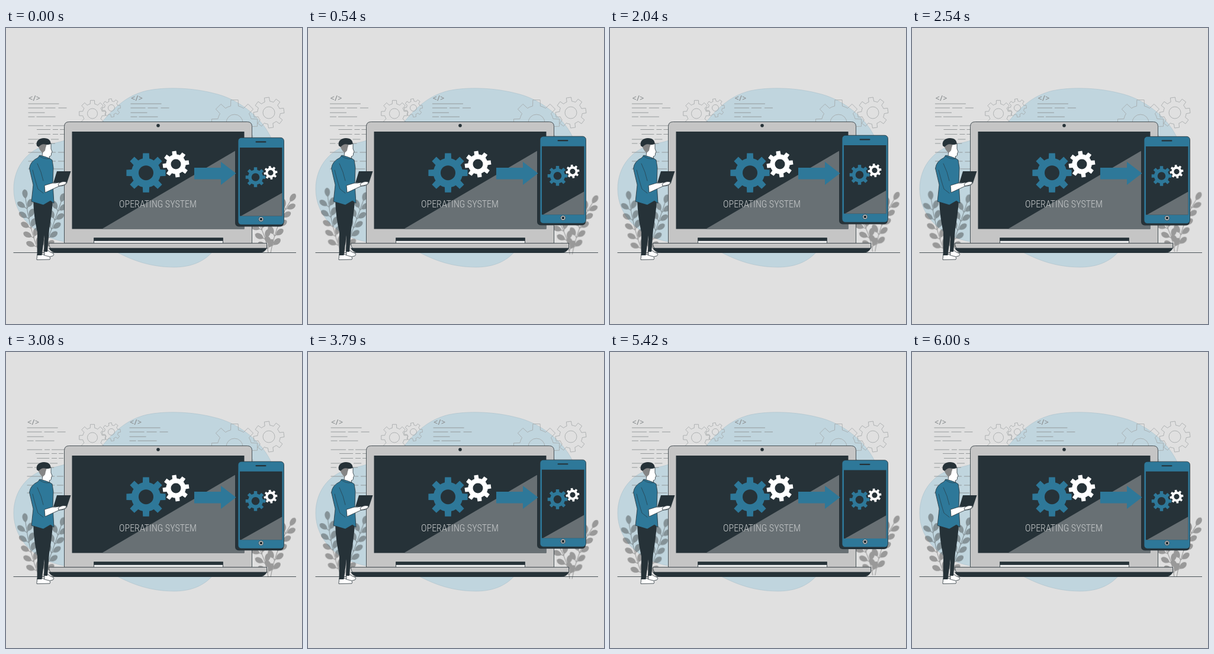
These frames come from a looping animation (500 by 500 pixels, 6040 ms). An HTML page:

```html
<!DOCTYPE html>
<html lang="en">
<head>
<meta charset="utf-8">
<title>Operating system</title>
<style>
html, body { margin: 0; width: 100%; height: 100%; overflow: hidden; background: #e0e0e0; }
svg { display: block; width: 100%; height: 100%; }
.dark { fill: #263238; }
.blue { fill: #2e7899; }
.white { fill: #fff; }
.glass { fill: #687074; }
.edge { stroke: #263238; stroke-width: .8; stroke-linejoin: round; }
.thin { fill: none; stroke: #263238; stroke-width: .6; stroke-linecap: round; }
.outline { fill: none; stroke: #a3a6a8; stroke-width: .8; }
.code { fill: none; stroke: #8e9294; stroke-width: .9; }
.tag { fill: #8e9294; stroke: none; font: 600 12.5px "Open Sans", sans-serif; letter-spacing: .4px; }
#plants { opacity: .38; }
.leaf { fill: #222; }
.stem { fill: none; stroke: #222; stroke-width: 1.1; }
#title { fill: #c9cccd; font: 300 16px "Roboto Condensed", "Open Sans Condensed", "Liberation Sans Narrow", Roboto, "Open Sans", sans-serif; font-stretch: 75%; text-anchor: middle; }
</style>
</head>
<body>
<svg viewBox="0 0 500 500">
  <path fill="#c0d5de" stroke="#a9c0ca" stroke-width=".6" d="M13 272C13 234 37 202 80 195C112 188 145 174 163 158C185 132 205 114 237 106C270 99 315 101 350 110C392 119 430 150 446 182C468 225 452 290 415 318C380 345 362 368 347 380C330 398 307 404 284 404C245 404 215 393 188 379C160 366 125 365 98 361C50 352 13 318 13 272Z"/>
  <g id="outlines"></g>
  <g id="code" class="code"></g>
  <g id="plants"></g>
  <path class="edge" d="M12.5 379.5H490"/>

  <g id="laptop">
    <path class="edge" fill="#c5c5c5" d="M98.5 364V166.5Q98.5 158.5 106.5 158.5H407.5Q415.5 158.5 415.5 166.5V364Z"/>
    <path class="dark" d="M111.500 175H402.500V339.500H111.500Z"/>
    <path class="glass" d="M162 339.5L402.5 198.5V339.5Z"/>
    <circle class="dark" cx="257" cy="164.7" r="2.8"/>
    <path class="edge" fill="#f4f4f4" d="M148.5 354.5H366.5V364H148.5Z"/>
    <path class="dark" d="M148.500 354.500H366.500V359.700H148.500Z"/>
    <path class="dark" d="M72 371.5H441Q437 380 427 380H87Q76 380 72 371.5Z"/>
    <path class="edge" fill="#c5c5c5" d="M72.5 363.5H440.5V372H76Q72.5 370 72.5 363.5Z"/>
    <text id="title" x="256.5" y="297" dy=".36em">OPERATING SYSTEM</text>
  </g>

  <g id="phone">
    <rect class="dark" x="387" y="187" width="82" height="148.500" rx="6"/>
    <rect class="blue edge" x="392" y="185.300" width="77.500" height="147" rx="5.500"/>
    <path class="dark" d="M395 202H466.500V317.500H395Z"/>
    <path class="glass" d="M397 317.500L466.500 278.500V317.500Z"/>
    <rect class="dark" x="421.500" y="191.300" width="18" height="2.200" rx="1.100"/>
    <circle class="white edge" cx="430.800" cy="323" r="4"/>
    <rect class="dark" x="428.500" y="320.700" width="4.600" height="4.600" rx="1"/>
  </g>
  <path class="blue" d="M318 236H363V226L388.500 245.500L363 265V255.500H318Z"/>

  <g id="person">
    <path class="white edge" d="M65 385L65 376L70 375.500Q74 379 80 380.500Q82 385 77 385.500L68 388Z"/>
    <path class="white edge" d="M52 390L53 382L61 382Q66 385 73 386Q76 388 74 391L52 391.500Z"/>
    <path class="dark" d="M46 291L79 292Q77 318 73 340L70 378H64L65 350L60.500 384H52.500L53 345Q47 320 46 291Z"/>
    <path class="white edge" d="M62 204L61 217Q68 224 74 221L73 217Q77 217 76.500 212L78 209L76 204V195H65Z"/>
    <path fill="#858585" d="M54 196L69 196L67 202L66 207L62 211Q55 206 54 196Z"/>
    <path class="dark" d="M52 199C50 191 56 186 64 186C72 186 76 190 75.500 196Q71 198 66 196.500Q60 195 55 201Z"/>
    <path class="blue edge" d="M54 219L57 215Q66 217 73 220L78 223L80 236L79 262L81 296L75 292L63 299L43 293L46 265L39.500 237Q41 225 54 219Z"/>
    <path class="thin" d="M56 216Q64 222 73 221M53 229Q60 243 63 258M45 240Q50 260 54 272L63 279"/>
    <path class="white edge" d="M65 266L66 278L90 267Q101 267 103 261L97 258L84 262L78 262Z"/>
    <path class="dark" d="M80 261.500L86 242H109.500L103 261.500Z"/>
    <path class="white edge" d="M88 264Q93 258 102 260Q103 262 98 265L89 267Z"/>
  </g>
</svg>
<script>
const LOOP = 6040;
const $ = id => document.getElementById(id);

function add(parent, tag, attrs) {
  const node = document.createElementNS("http://www.w3.org/2000/svg", tag);
  for (const name in attrs) node.setAttribute(name, attrs[name]);
  parent.append(node);
  return node;
}

// Eight-toothed wheel with a round hole; tilt in degrees.
function gear(parent, cls, x, y, radius, hole, tilt = 0) {
  const body = radius * .74;
  const at = (r, deg) => {
    const a = (deg + tilt) * Math.PI / 180;
    return (x + r * Math.cos(a)).toFixed(2) + " " + (y + r * Math.sin(a)).toFixed(2);
  };
  let d = "";
  for (let deg = 0; deg < 360; deg += 45) {
    d += (deg ? `A${body} ${body} 0 0 1 ` : "M") + at(body, deg - 13) +
      "L" + at(radius, deg - 9) + "L" + at(radius, deg + 9) + "L" + at(body, deg + 13);
  }
  d += `A${body} ${body} 0 0 1 ${at(body, -13)}ZM${x - hole} ${y}` +
    `a${hole} ${hole} 0 1 0 ${2 * hole} 0a${hole} ${hole} 0 1 0 ${-2 * hole} 0Z`;
  add(parent, "path", { class: cls, d, "fill-rule": "evenodd" });
}

// Curved stem carrying pairs of leaves and one at the tip.
function plant(from, bend, to, pairs, size = 15.5) {
  const group = $("plants");
  const w = size * .39;
  const leaf = (x, y, deg, gap) => {
    const turn = `translate(${x} ${y}) rotate(${deg}) translate(${gap} 0)`;
    add(group, "path", {
      class: "leaf",
      d: `M0 0C${size * .25} ${-w} ${size * .9} ${-w} ${size} 0C${size * .9} ${w} ${size * .25} ${w} 0 0Z`,
      transform: turn
    });
    add(group, "path", { class: "stem", d: `M${-gap} 0H1`, transform: turn });
  };
  add(group, "path", { class: "stem", d: `M${from}Q${bend} ${to}` });
  for (let i = 0; i <= pairs; i++) {
    const t = .12 + .88 * i / pairs, s = 1 - t;
    const [x, y] = [0, 1].map(k => s * s * from[k] + 2 * s * t * bend[k] + t * t * to[k]);
    const [dx, dy] = [0, 1].map(k => s * (bend[k] - from[k]) + t * (to[k] - bend[k]));
    const deg = Math.atan2(dy, dx) * 180 / Math.PI;
    if (i === pairs) leaf(x, y, deg, 0);
    else {
      leaf(x, y, deg - 46, 4);
      leaf(x, y, deg + 36, 3);
    }
  }
}

function codeRow(y, ...ends) {
  let d = "";
  for (let i = 0; i < ends.length; i += 2) d += `M${ends[i]} ${y}H${ends[i + 1]}`;
  add($("code"), "path", { d });
}

gear($("outlines"), "outline", 146, 144.5, 22.5, 8.5);
gear($("outlines"), "outline", 178, 135, 15.5, 5.5, -8);
gear($("outlines"), "outline", 386, 160, 39, 14);
gear($("outlines"), "outline", 444, 143, 26, 10, -8);

for (const x of [38, 211]) {
  add($("code"), "text", { class: "tag", x, y: 123 }).textContent = "</>";
  const left = x - .5;
  codeRow(128, left, left + 52);
  codeRow(135, left, left + 25, left + 29, left + 46, left + 51, left + 65);
  codeRow(143, left, left + 28);
  codeRow(150, left, left + 11, left + 14, left + 46);
}
codeRow(165, 37.5, 63, 67, 76, 79, 102);
codeRow(171.5, 52, 75, 79, 88, 91, 99);
codeRow(179.5, 54, 75, 79, 88, 91, 99);
codeRow(188, 37.5, 62, 76, 89);
codeRow(195, 37.5, 47, 50, 83);
codeRow(210, 37.5, 63, 78, 84, 88, 99);
codeRow(225, 37.5, 51, 78, 84, 88, 99);
codeRow(238, 37.5, 44, 80, 97);

plant([56, 380], [39, 338], [33, 288], 5);
plant([62, 380], [78, 338], [93, 294], 5);
plant([443, 380], [440, 352], [424, 325], 3);
plant([447, 380], [456, 330], [480, 293], 5);

gear($("laptop"), "blue", 236.5, 244.7, 33.5, 12.5);
gear($("laptop"), "white", 287, 230, 22.5, 8.5, -8);
gear($("phone"), "blue", 421.5, 252, 17, 6.8);
gear($("phone"), "white", 447, 244.5, 11.5, 4.6, -8);

const title = $("title");
title.style.fontSize = 16 * 131 / title.getComputedTextLength() + "px";

const shakeStops = [0, -1, 2, -4, 4, -4, 4, -4, 2, -1, 0];

function shake(p) {
  const i = Math.min(9, Math.floor(p * 10));
  return shakeStops[i] + (shakeStops[i + 1] - shakeStops[i]) * (p * 10 - i);
}

const sway = p => p < .25 ? 4 * p : p < .75 ? 2 - 4 * p : 4 * p - 4;
const rise = p => 1 - Math.abs(1 - 2 * p);

function draw(time) {
  const whole = time % LOOP / LOOP;
  const half = whole * 2 % 1;
  $("code").setAttribute("transform", `translate(${.6 * shake(whole)} 0)`);
  $("plants").setAttribute("transform", `rotate(${sway(half)} 253 325)`);
  $("phone").setAttribute("transform", `translate(0 ${-6.2 * rise(half)})`);
}

const start = performance.now();
function tick() {
  draw(performance.now() - start);
  requestAnimationFrame(tick);
}
tick();
</script>
</body>
</html>
```
